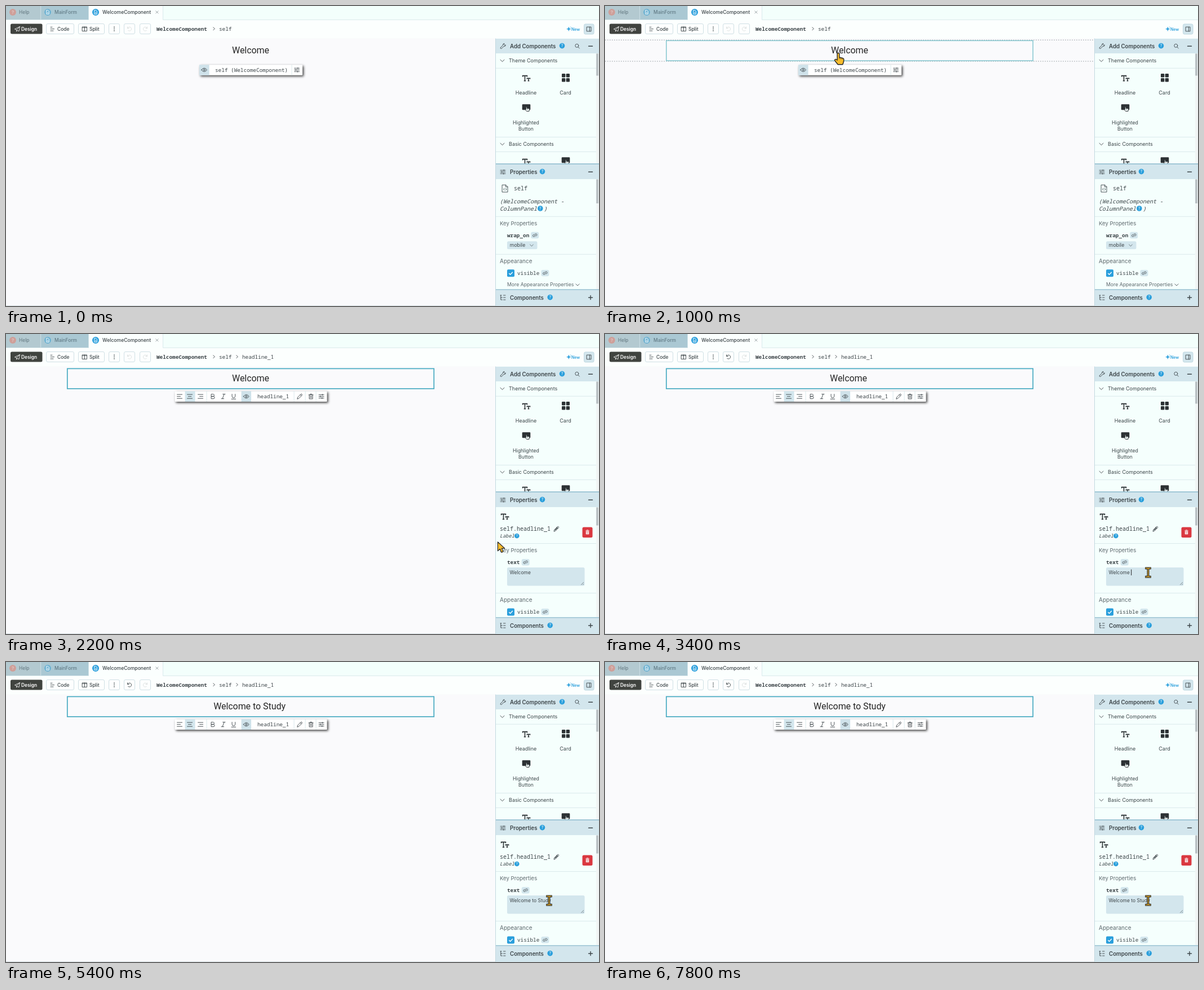
An HTML page for the animation above (8 s loop, 1052 px wide and 532 px high).

```html
<!DOCTYPE html>
<html lang="en">
<head>
<meta charset="utf-8">
<title>Component designer</title>
<style>
html, body { margin: 0; width: 100%; height: 100%; overflow: hidden; background: #fafafc; }
svg { display: block; width: 100%; height: 100%; }
text { font: 9px Inter, sans-serif; fill: #3d4549; white-space: pre; }
.mid { text-anchor: middle; }
.btn { font-size: 8.4px; font-weight: 500; }
.head { font-size: 9.7px; font-weight: 600; }
.sub { font-size: 9.6px; fill: #5f696e; }
.small { font-size: 8.7px; }
.mono { font: 9.35px "Noto Sans Mono", monospace; }
.mono.big { font-size: 10px; }
.bold { font-weight: 600; }
.it { font-style: italic; }
.title { font: 15.9px Roboto, sans-serif; fill: #252525; text-anchor: middle; }
.ln { fill: none; stroke: #3d4549; stroke-width: .9; stroke-linecap: round; stroke-linejoin: round; }
.fat { stroke-width: 1.4; }
.thin { stroke-width: .7; }
.rule { fill: none; stroke: #dbe9ec; }
.box { fill: #fdfffe; stroke: #d0dfe5; }
.tint { fill: #d3e6ed; }
.bar { fill: #fff; filter: drop-shadow(2px 2.5px 2px rgba(0,0,0,.75)); }
</style>
</head>
<body>
<svg viewBox="0 0 1052 532" preserveAspectRatio="none">
<defs>
  <g id="q"><circle r="4.8" fill="#2a9fdc"/><text class="mid" y="2.5" style="font-size:7px;fill:#fff">?</text></g>
  <g id="doc"><path d="M-2.3-3.4H.8L2.4-1.8V3.4H-2.3z" fill="none" stroke="#fff" stroke-width=".9"/><path d="M-1 0H1.2M-1 1.6H1.2" stroke="#fff" stroke-width=".7"/></g>
  <g id="link"><rect class="tint" x="-7" y="-5.7" width="14" height="11.4" rx="3"/><path class="ln thin" transform="rotate(-20)" d="M-.8-1.8H-2.1a1.8 1.8 0 0 0 0 3.6h1.3M.8 1.8H2.1a1.8 1.8 0 0 0 0-3.6H.8M-1.4 0H1.4"/></g>
  <g id="eye" class="ln"><path d="M-5 0Q0-6.4 5 0Q0 6.4-5 0z"/><circle r="1.5"/></g>
  <path id="sliders" class="ln" d="M-4.5-3H4.5M-4.5 0H4.5M-4.5 3H4.5M1.8-4v2M-1.8-1v2M1.2 2v2"/>
  <path id="trash" class="ln" d="M-4-2.8H4M-1.4-2.8V-4.2H1.4V-2.8M-3-2.8V4.3H3V-2.8M-1-.8V2.4M1-.8V2.4"/>
  <path id="pencil" class="ln" d="M-4.2 4.2l.8-2.8 5.4-5.4q1-.8 1.9.1t.1 1.9L-1.4 3.4zM1-3l2 2"/>
  <path id="chev" class="ln" d="M-3.5-1.7L0 1.7 3.5-1.7"/>
  <path id="gt" class="ln" d="M-1.2-2.5L1.2 0-1.2 2.5"/>
  <path id="tt" d="M-6.4-2.6V-4.4H1.4V-2.6M-2.5-4.4V4.7M-4.2 4.7H-.8M1.4 1.6V.2H6.6V1.6M4 .2V4.7M2.7 4.7H5.3" fill="none" stroke="#2c3134" stroke-width="1.6"/>
  <g id="press"><rect x="-7.3" y="-5.2" width="14.6" height="10" rx="1.3" fill="#2c3134"/><path d="M-.7-.4q.9-.9 1.6 0l.2 2 3.4.7q1.2.4 1 1.7L4.9 7.2H.9L-1.9 4.5q0-1.2 1.4-.7z" fill="#f5fffd" stroke="#2c3134" stroke-width="1"/><path d="M1.2 2V4.2M2.8 2.4V4.4" stroke="#2c3134" stroke-width=".6"/></g>
  <path id="undo" class="ln" d="M-3.4-3.7V-.9H-.7M-3.2-1.1A3.5 3.5 0 1 1-2.5 2.6"/>
  <path id="lines" class="ln" d="M-4.5-3.5H4.5M-4.5 3.5H4.5M-4.5 0H1.5"/>
  <clipPath id="listClip"><rect x="869" y="258" width="178" height="21.5"/></clipPath>
  <clipPath id="propClip"><rect x="869" y="307" width="178" height="195"/></clipPath>
</defs>

<rect width="1052" height="532" fill="#fafafc"/>

<!-- tabs -->
<rect width="1052" height="25" fill="#f3fffc"/>
<rect width="61.5" height="24.5" fill="#b3c9d0"/>
<rect x="62" width="84.5" height="24.5" fill="#aac8d3"/>
<rect x="147" width="131" height="25" fill="#fbfffe"/>
<path class="rule" d="M0 24.5H147M278.5 0V24.5H1052"/>
<path d="M61.7 0V24.5" stroke="#c9dce3"/>
<circle cx="12" cy="11" r="6" fill="#cf9f99"/><text class="mid" x="12" y="14" style="font-size:8px;fill:#e8d9d8">?</text>
<text class="btn" x="23" y="14.2" style="fill:#6c8089">Help</text>
<circle cx="74" cy="11" r="6" fill="#6fb3d2"/><use href="#doc" x="74" y="11"/>
<text class="btn" x="86" y="14.2" style="fill:#627b86">MainForm</text>
<circle cx="159" cy="11" r="6" fill="#2a9fdc"/><use href="#doc" x="159" y="11"/>
<text class="btn" x="171" y="14.2" style="font-size:8.6px">WelcomeComponent</text>
<path class="ln thin" d="M265.7 8.7l4.4 4.4M270.1 8.7l-4.4 4.4" style="stroke:#7a868b"/>

<!-- top toolbar -->
<rect y="25" width="1052" height="32.5" fill="#fcfffe"/>
<rect x="8" y="31.5" width="56.5" height="18" rx="2.5" fill="#40433f"/>
<path d="M15.5 40.9L24.6 36.5 23 44.8 19.9 43.1 18.7 45.2V42.3zM18.7 42.3L24.6 36.5" fill="none" stroke="#fff" stroke-width=".8" stroke-linejoin="round"/>
<text class="btn bold" x="27" y="43.6" style="fill:#fff">Design</text>
<rect class="box" x="71.5" y="31.5" width="49" height="18" rx="2.5"/>
<path class="ln" d="M79 37.5H82M79 40.7H85.5M79 44H84"/><text class="btn" x="91" y="43.6">Code</text>
<rect class="box" x="128.5" y="31.5" width="46" height="18" rx="2.5"/>
<path class="ln" d="M135.5 37H143.5V44.5H135.5zM139.5 37V44.5M135.5 38.2H143.5"/><text class="btn" x="148" y="43.6">Split</text>
<rect class="box" x="182.5" y="31.5" width="19" height="18" rx="2.5"/>
<g fill="#333c40"><circle cx="192" cy="37.4" r=".85"/><circle cx="192" cy="40.6" r=".85"/><circle cx="192" cy="43.8" r=".85"/></g>
<rect class="box" x="209.5" y="31.5" width="19" height="18" rx="2.5"/><use id="undoIcon" href="#undo" x="219" y="40.5"/>
<rect class="box" x="237.5" y="31.5" width="19" height="18" rx="2.5"/><use href="#undo" transform="translate(247 40.5) scale(-1 1)" opacity=".17"/>
<text class="mono bold" x="267" y="43.7">WelcomeComponent</text><use href="#gt" x="369" y="40.3"/>
<text class="mono" x="378" y="43.7">self</text>
<g class="picked"><use href="#gt" x="410" y="40.3"/><text class="mono" x="419" y="43.7">headline_1</text></g>
<path d="M998.3 37l1 2.8 2.8 1-2.8 1-1 2.8-1-2.8-2.8-1 2.8-1zM1001.8 36.3v2.4M1000.6 37.5h2.4" fill="#2a9fdc" stroke="#2a9fdc" stroke-width=".3"/>
<text x="1003" y="43.5" style="font-size:7px;font-weight:600;fill:#2a9fdc">New</text>
<rect x="1025.5" y="32" width="17.5" height="18" rx="2.5" class="tint" stroke="#c0d8e1"/>
<path class="ln" d="M1030.5 37.2H1038V44.8H1030.5zM1035.3 37.2V44.8"/>

<!-- canvas -->
<path d="M0 531.5H868" stroke="#d5dee2"/>
<path id="rowDash" d="M0 60.3H868M0 98H868" fill="none" stroke="#8f979b" stroke-width=".8" stroke-dasharray="2 2"/>
<rect id="frame" x="108.8" y="61.4" width="650.4" height="35.6" fill="none"/>
<text class="title" id="title" x="434" y="84.4"></text>

<g id="selfBar">
  <rect class="bar" x="343" y="104.2" width="183" height="18.6" rx="1"/>
  <rect x="343" y="104.2" width="17.5" height="18.6" fill="#cfe2ea"/><use href="#eye" x="351.6" y="113.3"/>
  <text class="mono" x="371" y="116.6">self (WelcomeComponent)</text>
  <path class="rule" d="M507 104.2V122.8"/><use href="#sliders" x="516" y="113.3"/>
</g>
<g id="headBar">
  <rect class="bar" x="299.5" y="-9.3" width="270" height="18.6" rx="1"/>
  <rect class="tint" x="317.5" y="-9.3" width="18" height="18.6"/>
  <rect id="eyeBg" x="417.5" y="-9.3" width="17.5" height="18.6"/>
  <path class="rule" d="M356 -9.3V9.3M511 -9.3V9.3M531 -9.3V9.3M550 -9.3V9.3"/>
  <g class="fade">
    <use href="#lines" x="308"/>
    <path class="ln" d="M321.5-3.5H330.5M323.3 0H328.7M321.5 3.5H330.5"/>
    <use href="#lines" transform="translate(345 0) scale(-1 1)"/>
    <path class="ln" d="M364.4-4H367.4a2 2 0 0 1 0 4H364.4zM364.4 0H368a2 2 0 0 1 0 4H364.4z"/>
    <path class="ln" d="M384.5-4H389M382 4H386.5M387-4L384 4"/>
    <path class="ln" d="M401-4V-.3a2.8 2.8 0 0 0 5.6 0V-4M400 4.6H407.6"/>
    <use href="#pencil" x="521"/><use href="#trash" x="541"/><use href="#sliders" x="559.5"/>
  </g>
  <use href="#eye" x="426.2"/>
  <text class="mono" x="446" y="3.2">headline_1</text>
</g>

<!-- side panel -->
<rect x="868.5" y="57.5" width="183.5" height="474.5" fill="#f5fffd"/>
<path class="rule" d="M869 110.3H1047M869 232.5H1047M869 258.5H1047"/>
<rect class="tint" x="869" y="58" width="183" height="26"/>
<path class="ln" d="M877.5 73.5L881.3 69.8Q880.8 67 884 66.4L883.4 68.7 884.3 69.6 886.5 69Q886 72.3 883 71.7L879.2 75.3Q878 76 877.3 75.2T877.5 73.5z"/>
<text class="head" x="894" y="74.6">Add Components</text><use href="#q" x="986.5" y="70.6"/>
<circle class="ln" cx="1012.8" cy="70.4" r="3"/><path class="ln" d="M1015 72.8l2.3 2.3"/>
<path class="ln fat" d="M1033.5 71.3H1040.5"/>
<use href="#chev" x="880.5" y="97"/><text x="892" y="100.3">Theme Components</text>
<use href="#tt" x="923" y="128"/><text class="mid" x="922.5" y="157.2">Headline</text>
<g fill="#2c3134"><rect x="986" y="120" width="6.3" height="6.5" rx="1.3"/><rect x="986" y="128" width="6.3" height="6.5" rx="1.3"/><rect x="993.7" y="120" width="6.3" height="6.5" rx="1.3"/><rect x="993.7" y="128" width="6.3" height="6.5" rx="1.3"/></g>
<text class="mid" x="992.5" y="157.2">Card</text>
<use href="#press" x="923" y="179.5"/>
<text class="mid small" x="922.5" y="210.3">Highlighted</text><text class="mid small" x="922.5" y="221.4">Button</text>
<use href="#chev" x="880.5" y="245"/><text x="892" y="248.3">Basic Components</text>
<g clip-path="url(#listClip)"><use href="#tt" x="923" y="276"/><use href="#press" x="993" y="273.5"/></g>
<rect x="1047" y="84" width="5" height="195" fill="#f1f5f5"/><rect x="1047" y="84.5" width="4" height="39" fill="#bcc3c6"/>

<rect class="tint" x="869" y="280" width="183" height="27"/><path d="M869 280H1052" stroke="#8dbace" stroke-width="1.3"/>
<use href="#sliders" x="881.5" y="294.3"/><text class="head" x="894" y="297.6">Properties</text><use href="#q" x="951.5" y="293.6"/>
<path class="ln fat" d="M1033.5 294.3H1040.5"/>
<rect x="1047" y="307" width="5" height="195" fill="#f1f5f5"/><rect id="thumb" x="1047" y="307.5" width="4" fill="#bcc3c6"/>

<g clip-path="url(#propClip)">
  <g id="selfProps">
    <path class="ln" d="M880.5 317.3H886.8L890 320.5V330H880.5zM886.5 317.3V320.8H890M884.2 323.3L882.6 325 884.2 326.7M886.4 323.3L888 325 886.4 326.7"/>
    <text class="mono big" x="901" y="327">self</text>
    <text class="mono big it" x="876" y="349.5">(WelcomeComponent -</text>
    <text class="mono big it" x="876" y="362.6">ColumnPanel</text><use href="#q" x="947.8" y="359"/><text class="mono big it" x="954" y="362.6">)</text>
    <path class="rule" d="M869 373.3H1047M869 440.3H1047"/>
    <text class="sub" x="876" y="388.5">Key Properties</text>
    <text class="mono bold" x="889" y="409.8">wrap_on</text><use href="#link" x="938.2" y="406.5"/>
    <rect class="tint" x="889" y="417.3" width="53.5" height="14" rx="2.5"/>
    <text class="small" x="893.8" y="427.4">mobile</text><use href="#chev" transform="translate(932.5 424.5) scale(.8)"/>
    <text class="small" x="889" y="497.4" style="fill:#5f696e">More Appearance Properties</text><use href="#chev" transform="translate(1014 494.5) scale(.9)"/>
  </g>
  <g class="picked">
    <use class="fade" href="#tt" x="885" y="323.8"/>
    <text class="mono big" x="876" y="349.3">self.headline_1</text>
    <use href="#pencil" x="976.3" y="345.6"/><path class="ln fat" d="M974.3 347.6l4-4"/>
    <text class="mono it" x="876" y="361.3" style="font-size:8.6px">Label</text><use href="#q" transform="translate(906.3 358) scale(.9)"/>
    <rect x="1022.5" y="342.5" width="18" height="18.5" rx="2.5" fill="#da3840"/>
    <path d="M1028.2 349h6.6M1030.2 348.8v-1h2.6v1" stroke="#fff" stroke-width=".9" fill="none"/><path d="M1028.8 350.2h5.4v5h-5.4z" fill="#fff"/><path d="M1030.6 351.3v2.8M1032.4 351.3v2.8" stroke="#da3840" stroke-width=".7"/>
    <path class="rule" d="M869 371.5H1047M869 459.5H1047"/>
    <text class="sub" x="876" y="387.4">Key Properties</text>
    <text class="mono bold" x="889" y="408">text</text><use href="#link" x="921.7" y="404.7"/>
    <rect class="tint" x="889" y="414" width="137.5" height="32.5" rx="2.5"/>
    <path d="M1020 445l5-5M1023 445l2-2" stroke="#687479" stroke-width=".8"/>
    <text id="field" x="893.6" y="425.8" style="font-size:8.5px"></text>
    <path id="caret" d="M0 417.5V428" stroke="#222"/>
  </g>
  <g id="look">
    <text class="sub" x="876" y="455.8" style="font-size:10px">Appearance</text>
    <rect x="889" y="467.3" width="13" height="13" rx="2" fill="#2a9fdc"/><path d="M892.3 474l2.3 2.3 4.2-4.4" fill="none" stroke="#fff" stroke-width="1.4"/>
    <text class="mono bold" x="907" y="476.7" style="font-weight:500">visible</text><use href="#link" x="956.4" y="473.6"/>
  </g>
</g>

<rect class="tint" x="869" y="503" width="183" height="29"/><path d="M869 502.8H1052" stroke="#8dbace" stroke-width="1.3"/>
<path class="ln" d="M877.8 513V521H880.5M877.8 517H880.5M877 513H879M882.5 513H886M882.5 517H886M882.5 521H886"/>
<text class="head" x="894" y="520.6">Components</text><use href="#q" x="965.2" y="516.6"/>
<path class="ln fat" d="M1033.5 517H1040.5M1037 513.5V520.5"/>
<path d="M868.5 57.5V532" stroke="#c3d8e0"/>

<!-- pointers -->
<g id="arrow"><path d="M0 0V16l4-3.6 2.6 6.2 3-1.3-2.6-6h5.4z" fill="#f8bd2d" stroke="#262626" stroke-width="1.2" stroke-linejoin="round"/></g>
<g id="hand"><path d="M-2 1.2a1.9 1.9 0 0 1 3.8 0V7l6 1.4q2 .6 2 2.6l-.8 5q-.4 2-1.6 3.8H-.8L-6.3 13q-.8-1.5.6-2.4 1-.6 2.4.4L-2 12z" fill="#f8bd2d" stroke="#262626" stroke-width="1.4" stroke-linejoin="round"/><path d="M1.8 7V10M4.6 7.8V10.5M7.3 8.5V11" stroke="#262626" stroke-width=".8"/></g>
<g id="beam" fill="none"><path d="M-5.3-7.7H5.3M0-7.7V7.7M-5.3 7.7H5.3" stroke="#222" stroke-width="3.8"/><path d="M-4.5-7.7H4.5M0-7.7V7.7M-4.5 7.7H4.5" stroke="#f0b52a" stroke-width="1.3"/></g>
</svg>
<script>
const LOOP = 8000, STEP = 200;
const $ = id => document.getElementById(id);
const show = (el, on) => { el.style.display = on ? '' : 'none'; };
const picked = document.querySelectorAll('.picked');
const fade = document.querySelectorAll('.fade');
const line = 'Welcome to Study Bu';

// [time, characters shown]
const typing = [[0, 7], [3400, 8], [3600, 9], [3800, 10], [4000, 11], [4200, 12], [4600, 13],
  [4800, 14], [5000, 15], [5200, 16], [5400, 17], [6600, 18], [6800, 19], [7000, 18], [7200, 17], [7800, 16]];
// [time, caret shown]
const blink = [[0, 0], [2800, 1], [5400, 0], [5800, 1], [6200, 0], [6600, 1], [7600, 0]];
// [time, x, y]
const route = [[200, 600, 480], [1000, 414, 84], [1600, 407.5, 92], [2600, 963.5, 423]];

const at = (table, t) => table.filter(row => row[0] <= t).pop()[1];
const ease = u => u < .5 ? 16 * u ** 5 : 1 - (2 - 2 * u) ** 5 / 2;

function pointerAt(t) {
  const i = route.findIndex(p => p[0] > t);
  if (i < 0) return route[route.length - 1].slice(1);
  const [t0, x0, y0] = route[i - 1], [t1, x1, y1] = route[i];
  const k = ease((t - t0) / (t1 - t0));
  return [x0 + (x1 - x0) * k, y0 + (y1 - y0) * k];
}

function drawPointer(t, hover) {
  const kind = t < 200 ? '' : hover ? 'hand' : t >= 2400 ? 'beam' : 'arrow';
  for (const id of ['arrow', 'hand', 'beam']) show($(id), id === kind);
  if (kind) $(kind).setAttribute('transform', `translate(${pointerAt(t)})`);
}

function draw(t) {
  const chosen = t >= 1400, settled = t >= 1800, hover = t >= 800 && !chosen;
  const text = line.slice(0, at(typing, t));

  picked.forEach(el => show(el, chosen));
  fade.forEach(el => el.setAttribute('opacity', settled ? 1 : .7));
  show($('selfBar'), !chosen);
  show($('selfProps'), !chosen);
  show($('headBar'), chosen);
  show($('rowDash'), hover);
  show($('frame'), hover || chosen);
  $('frame').setAttribute('stroke', chosen ? '#48abc2' : '#84c6cf');
  $('frame').setAttribute('stroke-width', chosen ? 1.7 : 1.5);
  $('headBar').setAttribute('transform', `translate(0 ${settled ? 110.7 : 112.2})`);
  $('eyeBg').setAttribute('fill', settled ? '#cfe2ea' : '#9fc6d8');
  $('undoIcon').setAttribute('opacity', t >= 3400 ? 1 : .17);
  $('look').setAttribute('transform', `translate(0 ${chosen ? 19.2 : 0})`);
  $('thumb').setAttribute('height', chosen ? 32 : 42.5);

  $('title').textContent = text;
  $('field').textContent = text;
  show($('caret'), at(blink, t));
  if (chosen) $('caret').setAttribute('transform', `translate(${894 + $('field').getComputedTextLength()} 0)`);
  drawPointer(t, hover);
}

const start = performance.now();
let last = -1;
function tick() {
  const t = Math.floor((performance.now() - start) % LOOP / STEP) * STEP;
  if (t !== last) draw(last = t);
  requestAnimationFrame(tick);
}
tick();
</script>
</body>
</html>
```
